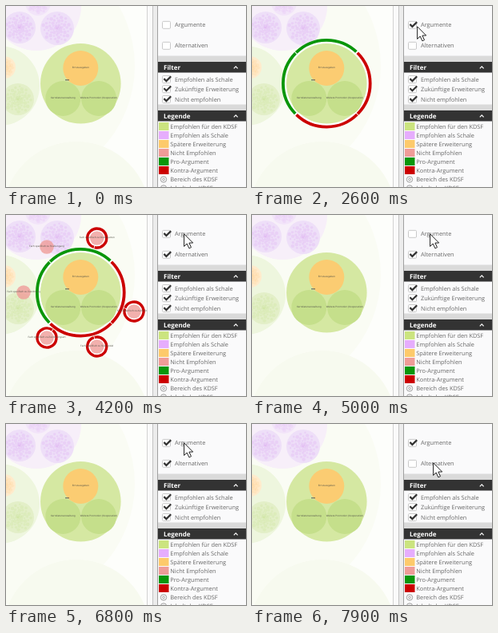
An HTML page that plays this animation: 300x227 px, repeating every 8000 ms.

```html
<!DOCTYPE html>
<html lang="de">
<head>
<meta charset="utf-8">
<style>
  html, body { margin: 0; width: 100%; height: 100%; overflow: hidden; background: #fff; }
  svg { display: block; width: 100%; height: 100%; }
  text { font: 7.35px "Open Sans", "Noto Sans", sans-serif; fill: #686868; text-rendering: geometricPrecision; }
  .head { font-weight: 700; font-size: 8px; fill: #fff; }
  .tiny { font: 3px "Noto Sans", sans-serif; fill: #55554a; text-anchor: middle; }
</style>
</head>
<body>
<svg id="stage" viewBox="0 0 300 227" preserveAspectRatio="none">
  <clipPath id="mapClip"><rect width="176" height="227"/></clipPath>
  <g id="map" clip-path="url(#mapClip)"></g>
  <g id="sidebar"></g>
  <path id="cursor" d="M.6 .8V16.4L4.2 13L6.9 18.8L9.5 17.6L6.9 12H11.7Z" fill="#fff" stroke="#222" stroke-width="1"/>
</svg>
<script>
const LOOP = 8000;
const GREEN = '#0a960a', RED = '#cc0000', PINK = '#ef9c98';
const CX = 93.3, CY = 97.2;
const $ = id => document.getElementById(id);
const map = $('map'), sidebar = $('sidebar'), cursor = $('cursor');

function add(parent, tag, attrs = {}, text = '') {
  const node = document.createElementNS('http://www.w3.org/2000/svg', tag);
  for (const key in attrs) node.setAttribute(key, attrs[key]);
  node.textContent = text;
  parent.append(node);
  return node;
}
const rect = (p, x, y, width, height, fill) => add(p, 'rect', { x, y, width, height, fill });
const disc = (p, cx, cy, r, fill, more) => add(p, 'circle', { cx, cy, r, fill, ...more });
const label = (p, x, y, text, cls = '') => add(p, 'text', { x, y, class: cls }, text);
const show = (node, on) => node.setAttribute('visibility', on ? 'visible' : 'hidden');

function arc(p, cx, cy, r, from, to, stroke, width) {
  const point = deg => {
    const a = deg * Math.PI / 180;
    return `${cx + r * Math.cos(a)} ${cy + r * Math.sin(a)}`;
  };
  const large = to - from > 180 ? 1 : 0;
  add(p, 'path', {
    d: `M${point(from)}A${r} ${r} 0 ${large} 1 ${point(to)}`,
    fill: 'none', stroke, 'stroke-width': width
  });
}

// Sunflower arrangement of small translucent bubbles, denser at the centre
function cluster(cx, cy, r, base, dot) {
  disc(map, cx, cy, r, base);
  for (let i = 0; i < 60; i++) {
    const d = (r - 3) * (i / 60) ** 0.7, a = i * 2.4;
    disc(map, cx + d * Math.cos(a), cy + d * Math.sin(a), 1.2 + i % 3 * 0.5, dot, { opacity: 0.18 });
  }
}

// Map background
rect(map, 0, 0, 176, 227, '#fdfefb');
disc(map, 10, 75, 151, '#fafcf4');
disc(map, 88, 262, 92, '#f7faef');
disc(map, 38, 0, 56, '#f7eff9');
cluster(17, 27, 20, '#eedff8', '#d08ff0');
cluster(64, 28, 21, '#eedff8', '#d08ff0');
cluster(40, -4, 16, '#f2e4f9', '#dba6f3');
disc(map, -8, 100, 50, '#eef6de');
cluster(-2, 77, 14, '#ffebcc', '#ffca78');
cluster(15, 117, 20, '#e3efc8', '#bcdb80');

// Main bubble
const ring = add(map, 'g');
disc(ring, CX, CY, 54, '#fff');
arc(ring, CX, CY, 54.4, 136, 224.5, GREEN, 3.8);
arc(ring, CX, CY, 54.4, 225.5, 313, GREEN, 3.8);
arc(ring, CX, CY, 54.4, 315, 404.5, RED, 3.8);
arc(ring, CX, CY, 54.4, 405.5, 494, RED, 3.8);
disc(map, CX, CY, 50.3, '#d5e8a2');
disc(map, 93.3, 78, 22, '#fbcc72');
disc(map, 71.3, 116, 22, '#c5df8b');
disc(map, 116, 116, 22, '#c5df8b');
label(map, 93.3, 78, 'Ernstausgaben', 'tiny');
label(map, 71.3, 116, 'Kerndatenverwaltung', 'tiny');
label(map, 116, 116, 'Weitere Promotion (Kooperation)', 'tiny');
rect(map, 74, 92.3, 5, 1, '#555');

// Alternatives around the main bubble; some carry counter-arguments
const alternatives = add(map, 'g'), smallRings = add(alternatives, 'g');
[
  [51, 40, 0, 'Fach spezifisch zu Studiengang'],
  [113.7, 29, 1, 'Fach spezifisch zu Studienarten'],
  [22, 97, 0, 'Fach spezifisch zu Zuordnung'],
  [160, 121, 1, 'Fach spezifisch zu Aufnahmen'],
  [51, 154, 1, 'Fach spezifisch zu Zuordnungsart'],
  [113.7, 165, 1, 'Fach spezifisch zu Studienziel']
].forEach(([x, y, contra, text]) => {
  if (contra) {
    disc(smallRings, x, y, 12, '#fff');
    const a = Math.atan2(CY - y, CX - x) * 180 / Math.PI;
    arc(smallRings, x, y, 12, a + 2, a + 358, RED, 3.4);
  }
  disc(alternatives, x, y, 8.8, PINK, { opacity: 0.8 });
  label(alternatives, x, y, text, 'tiny');
});

// Splitter and sidebar
rect(sidebar, 176, 0, 14, 227, '#fafafa');
rect(sidebar, 176, 0, 1, 227, '#d2d2d2');
rect(sidebar, 183, 0, 1, 227, '#c4c4c4');
rect(sidebar, 184, 0, 5, 227, '#ececec');
rect(sidebar, 189, 0, 1, 227, '#a0a0a0');
rect(sidebar, 190, 0, 110, 227, '#fafafb');

function checkbox(y, text, checked) {
  const box = add(sidebar, 'rect', {
    x: 195.5, y: y - 4.5, width: 10, height: 9, rx: 1.2, fill: '#fff', stroke: '#c4c4c4', 'stroke-width': 0.9
  });
  const tick = add(sidebar, 'path', {
    d: `M197.4 ${y - 0.9}L200.4 ${y + 2.1}L206.2 ${y - 3.7}`,
    fill: 'none', stroke: '#333', 'stroke-width': 2.2
  });
  show(tick, checked);
  label(sidebar, 211, y + 2.5, text);
  return { box, tick };
}
const argumentsBox = checkbox(23.8, 'Argumente', false);
const alternativesBox = checkbox(49.8, 'Alternativen', false);
checkbox(92, 'Empfohlen als Schale', true);
checkbox(104.2, 'Zukünftige Erweiterung', true);
checkbox(117, 'Nicht empfohlen', true);

function header(y, text) {
  rect(sidebar, 190, y - 7.5, 110, 7.5, '#dadada');
  rect(sidebar, 190, y, 110, 13.5, '#333');
  label(sidebar, 197, y + 9.8, text, 'head');
  add(sidebar, 'path', { d: `M284.8 ${y + 8.3}l2.4-2.4l2.4 2.4`, fill: 'none', stroke: '#fff', 'stroke-width': 1.2 });
}
header(70, 'Filter');
header(131, 'Legende');

[
  ['Empfohlen für den KDSF', '#cbe47f'],
  ['Empfohlen als Schale', '#e6adfd'],
  ['Spätere Erweiterung', '#fdca6b'],
  ['Nicht Empfohlen', PINK],
  ['Pro-Argument', GREEN],
  ['Kontra-Argument', RED],
  ['Bereich des KDSF'],
  ['Inhalt des KDSF']
].forEach(([text, color], i) => {
  const y = 146 + i * 11;
  label(sidebar, 205.3, y + 8.2, text);
  if (color) return rect(sidebar, 191, y, 12.5, 10, color);
  disc(sidebar, 197, y + 5.5, 3.7, 'none', { stroke: '#888', 'stroke-width': 0.8 });
  disc(sidebar, 197, y + 5.5, 1.4, 'none', { stroke: '#888', 'stroke-width': 0.7 });
});

// Pointer positions: [time, x, y], held until the next one
const pointer = [
  [0, 206, -40], [1100, 205.5, -12], [1200, 206, 0], [1300, 206, 10], [1400, 206, 17], [1500, 206, 22],
  [1600, 206, 25], [2900, 217, 43], [3000, 226, 58], [3200, 226, 51],
  [4000, 225, 42], [4100, 223, 30], [4200, 222, 23],
  [7100, 222, 26], [7200, 223, 33], [7300, 224, 41], [7400, 225, 46], [7500, 226, 48]
];

function render(t) {
  const within = (from, to) => t >= from && t < to;
  const [, x, y] = pointer.findLast(step => step[0] <= t);
  cursor.setAttribute('transform', `translate(${x} ${y})`);

  show(argumentsBox.tick, within(2000, 5000) || t >= 6800);
  show(alternativesBox.tick, within(3600, 7900));
  argumentsBox.box.setAttribute('fill', within(1800, 2000) ? '#e4e4e4' : '#fff');

  // Every toggle clears the extras until the map is rebuilt
  const both = within(4100, 5000) || within(7300, 7900);
  show(ring, within(2600, 3600) || both);
  show(alternatives, both || within(5500, 6800));
  show(smallRings, both);
}

function frame(now) {
  render(now % LOOP);
  requestAnimationFrame(frame);
}
render(0);
requestAnimationFrame(frame);
</script>
</body>
</html>
```
